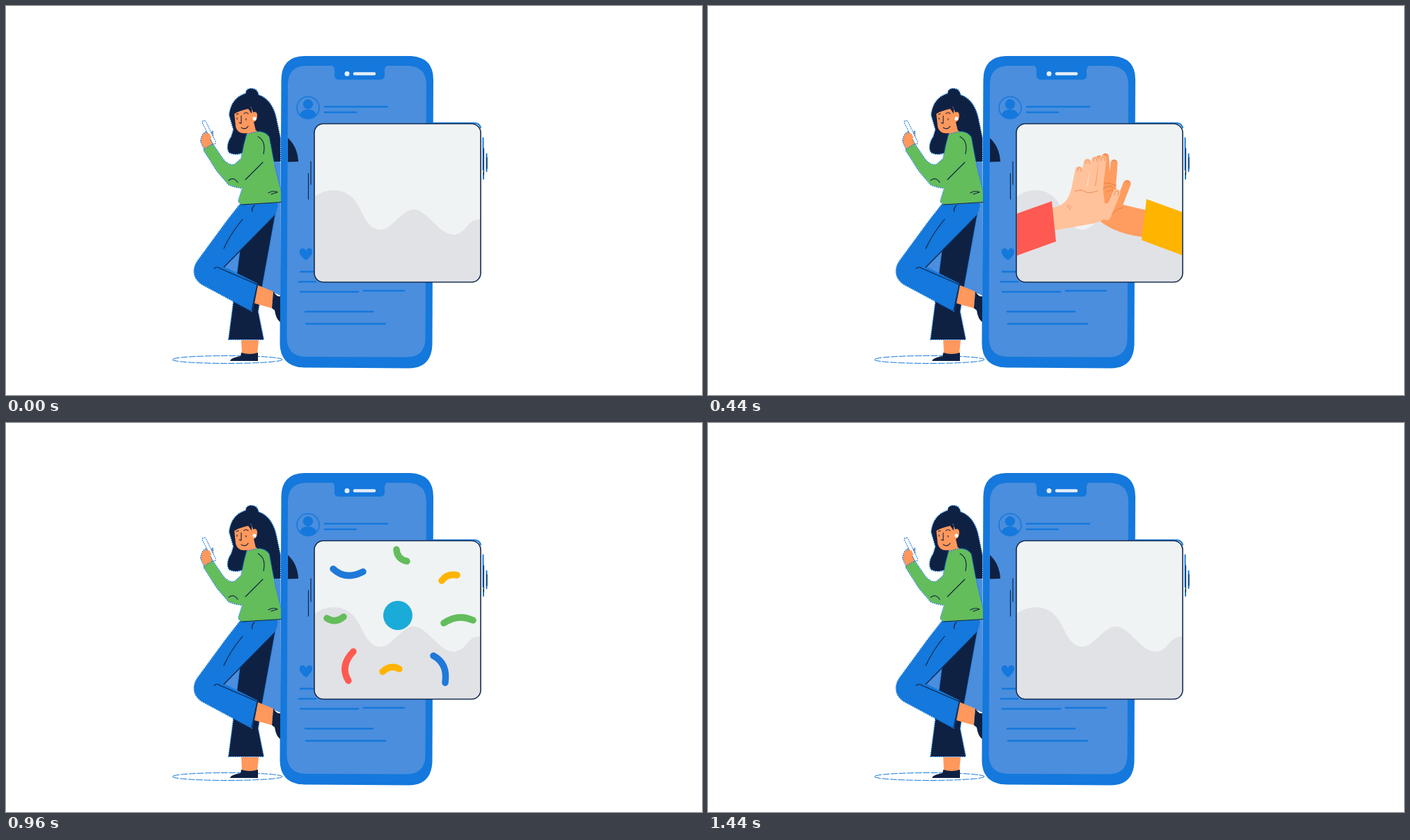
Write an HTML page that moves like this. It is 1000 px wide and 560 px high and loops after 1680 ms.

```html
<!DOCTYPE html>
<html lang="en">
<head>
<meta charset="utf-8">
<style>
  html, body { margin: 0; width: 100%; height: 100%; overflow: hidden; background: #fff; }
  svg { display: block; width: 100vw; height: 100vh; }
  .line { fill: none; stroke-linecap: round; stroke-linejoin: round; }
  .navy { fill: #0f2143; }
  .blue { fill: #1478dc; }
  .sky { fill: #4a8edd; }
  .skin { fill: #ff985c; }
  .ink { stroke: #0f2143; stroke-width: 1.1; }
  .edge { stroke: #1478dc; stroke-width: 2; stroke-dasharray: 2 1; paint-order: stroke; }
</style>
</head>
<body>
<svg viewBox="0 0 1000 560">
  <defs>
    <clipPath id="frame"><rect x="444" y="170.5" width="237" height="226" rx="12"/></clipPath>
  </defs>

  <!-- phone -->
  <path class="blue" d="M428 72H582Q614 74 614 106L612.500 488Q611 521 579 521.500L428 520.500Q394 519 393.500 486L395.500 106Q396 73 428 72Z"/>
  <path class="sky" d="M430 86H578Q604 87 604 114L602.500 479Q602 505 576 505.500L430 505Q404 504 403.500 478L405 112Q406 87 430 86Z"/>
  <path class="blue" d="M466 85Q472 86 472 92V100Q472 106 479 106H537Q544 106 544 100V92Q544 86 550 85Z"/>
  <circle cx="490" cy="97.500" r="3.500" fill="#e4edf8"/>
  <path class="line" d="M501 97.500H529" stroke="#e4edf8" stroke-width="4.500"/>
  <path class="navy" d="M405 190Q419 203 420 224L405 224.500Z"/>
  <g class="line" stroke="#1478dc" stroke-width="2.600">
    <circle cx="434" cy="146.500" r="16" stroke-width="1.500"/>
    <path d="M458 145H548M458 153H503M423 382.500H445M421 397H445M423 411.500H506M514 410H572M430 440H527M431 457.500H545"/>
  </g>
  <circle class="blue" cx="434" cy="141.500" r="7.200"/>
  <path class="blue" d="M422 157Q424 149 434 149Q444 149 446 157Q434 167 422 157Z"/>
  <path class="blue" d="M431 366C421 360 419 350 425 349Q429 348 431 353Q433 348 437 349C443 351 440 360 431 366Z"/>
  <path class="line ink" d="M438 224V257M434.500 241V278"/>

  <!-- woman -->
  <ellipse class="line" cx="318" cy="509" rx="79" ry="5.500" stroke="#1478dc" stroke-dasharray="9 2.500"/>
  <path class="sky" d="M385 224L394.500 225V268L386 232ZM386 300L390 284H394.500V417L360 402ZM340 348L302 377L340 394Z"/>
  <path class="navy edge" d="M345 126C344 119 353 117 359 121Q363 125 362 128C378 133 386 148 389 166L394 190V224H383L360 186L342 210Q332 216 321 211C316 204 320 194 324 188L327 178L321 157C323 139 332 130 345 126Z"/>
  <path class="skin" d="M328 154L352 145L355 153Q361 151 361 158Q361 165 356 167L360 184L347 186L346 183Q333 185 330 174Z"/>
  <path class="navy" d="M323 158Q336 150 348 148L353 155V148L346 137L329 145Z"/>
  <path class="line ink" d="M338 158L338 169L335 168M332 161V163M345 162V164M331 156L334 155M342 155Q345 152 348 155M338 175Q344 179 348 173"/>
  <circle cx="357" cy="162" r="2.600" fill="#fff"/>
  <path class="skin" d="M347 184L360 179L362 186L347 189Z"/>
  <path class="skin edge" d="M285 206L280 195Q281 183 289 181L295 185L297 180V198L296 202Z"/>
  <path class="edge" fill="#fff" d="M282 167Q285 164 287 167L301 196Q299 201 297 197Z"/>
  <path class="skin" d="M281 190L292 183L295 189L289 199Z"/>
  <path class="navy edge" d="M387 297L337 348L331 395L320 480H370L362 440L368 402Z"/>
  <path class="blue edge" d="M336 286L390 283Q390 293 385 302L313 376L361 400L353 439L286 403C269 395 266 379 277 365L318 309Z"/>
  <path fill="#63bd5b" class="edge" d="M346 185L362 181Q373 181 378 189L386 232L395 267V283L338 286L334 281L340 262Q328 261 320 257L303 237L284 207L297 199L312 221Q321 231 329 228L338 220L342 200Z"/>
  <path class="line ink" d="M362 188Q374 194 370 213M369 225L344 250M320 251Q327 245 333 254M377 269Q384 265 390 268L381 271M338 286L395 282.500M357 287Q352 291 354 296M386 302L313 376M340 307Q323 327 313 349M299 378Q303 374 308 378L361 401L353 438M346 467L363 469M349 471H361"/>
  <path class="skin" d="M362 402L384 411L382 435L357 428ZM338 481H363L361 501H339Z"/>
  <path class="navy" d="M384 411Q389 419 394 418V455Q388 451 386 438L382 435ZM322 511Q322 507 337 504L338 499Q350 503 362 499V511Z"/>

  <!-- card -->
  <path class="line" d="M614 168.500H674Q680 169 682 175M685.500 190V236M690.500 213V238M686 240V249" stroke="#1478dc" stroke-width="2"/>
  <path class="line ink" d="M686.500 205V243M691 218V234"/>
  <rect x="443" y="169.500" width="239" height="228" rx="13" fill="#eff3f4"/>
  <g clip-path="url(#frame)">
    <path fill="#e1e2e6" d="M443 275C460 262 482 262 497 275C513 291 516 322 538 322C555 322 568 293 586 293C605 293 622 329 643 329C662 329 660 308 682 307V398H443Z"/>
    <circle id="badge" r="21" fill="#1babd8"/>
    <g id="right">
      <g class="line" stroke="#ff9c60" stroke-width="10">
        <path d="M553 235L559 260M562 220L565 258M571 217L574 258M583.500 226L581 260"/>
        <path d="M602 256L588 292" stroke-width="11"/>
      </g>
      <path fill="#ff9c60" d="M554 254Q570 247 586 256L588 276Q592 286 600 287L630 294L627 333Q587 328 565 311Q549 292 554 254Z"/>
      <path class="line" stroke="#e57a3e" d="M558 257Q570 252 586 258M567 263Q578 256 582 262M572 268Q580 262 586 270M575 306Q582 294 596 290M600 253Q603 250 606 254M569 214Q572 211 574 215M581 223Q584 220 587 224"/>
      <path fill="#ffb400" d="M630 278L770 329V392L623 337Z"/>
    </g>
    <g id="left">
      <g class="line" stroke="#ffc29b" stroke-width="10.500">
        <path d="M533 236L526 270M545 225L538 266M556 222L550 264M567 221L562 266"/>
        <path d="M587 269L573 303" stroke-width="11"/>
      </g>
      <path fill="#ffc29b" d="M521 266Q541 255 567 260L570 284L585 284Q578 308 554 313L498 323L494 290Q516 288 521 266Z"/>
      <path class="line" stroke="#ed8d59" d="M527 267Q535 263 541 267T560 266M515 287L521 293M518 286L522 290M570 284Q575 281 579 272M531 238V234Q533 231 536 234V238M543 227V223Q545 220 548 223V227M554 224V220Q556 217 559 220V224M565 223V219Q567 216 570 219V223M584 272Q584 266 588 266Q591 268 589 273"/>
      <path fill="#ff5a52" d="M494 281L340 336V397L500 339Z"/>
    </g>
    <g id="confetti" class="line" stroke-width="9.500"></g>
  </g>
  <rect class="line" x="443" y="169.500" width="239" height="228" rx="13" stroke="#142a4e" stroke-width="1.600"/>
</svg>
<script>
const LOOP = 1680, STEP = 40;
const $ = id => document.getElementById(id);
const clamp = x => Math.min(1, Math.max(0, x));
const ramp = (t, a, b) => clamp((t - a) / (b - a));
const ease = x => x * x * (3 - 2 * x);

const BLUE = '#1f79d8', GREEN = '#63bd5b', AMBER = '#ffb400', RED = '#ff5a52';
// colour, centre, curve around the centre, start time, spin in degrees
const pieces = [
  [BLUE, 492, 217, 'M-22-7Q-4 10 21-3', 635, 7],
  [GREEN, 568, 191, 'M-7-9Q-6 5 8 8', 635, 7],
  [AMBER, 637, 222, 'M-11 5Q-3-6 11-3', 635, 7],
  [GREEN, 473, 282, 'M-12-1Q0 7 12-3', 720, 0],
  [GREEN, 650, 283, 'M-21 5Q0-9 21 1', 720, 5],
  [RED, 492, 350, 'M7-21Q-13 0 0 21', 740, 2],
  [AMBER, 553, 354, 'M-12 4Q0-7 12 0', 760, 1],
  [BLUE, 624, 354, 'M-10-19Q11-8 7 20', 760, -1]
].map(([color, x, y, d, start, spin]) => {
  const el = document.createElementNS('http://www.w3.org/2000/svg', 'path');
  el.setAttribute('d', d);
  el.setAttribute('stroke', color);
  $('confetti').append(el);
  return { el, x, y, start, spin };
});

function place(el, x, y, size, angle = 0) {
  el.setAttribute('visibility', size > 0 ? 'visible' : 'hidden');
  el.setAttribute('transform', `translate(${x} ${y}) rotate(${angle}) scale(${size})`);
}

function draw(t) {
  // 0 = palms touching, 1 = hands outside the card
  const away = t < 450 ? 1 - ease(ramp(t, 130, 440)) : ease(ramp(t, 460, 910));
  const shown = t >= 200 && t < 910 ? 'visible' : 'hidden';
  $('left').setAttribute('visibility', shown);
  $('right').setAttribute('visibility', shown);
  $('left').setAttribute('transform',
    `translate(${567 - 157 * away} ${217 + 39 * away}) rotate(${-13 * away}) scale(${1 - 0.08 * away}) translate(-567 -217)`);
  $('right').setAttribute('transform', `translate(${129 * away} ${13 * away})`);

  const leave = 1 - ease(ramp(t, 1280, 1440));
  place($('badge'), 563, 277, ease(ramp(t, 460, 620)) * leave);
  for (const p of pieces)
    place(p.el, p.x, p.y, ease(ramp(t, p.start, p.start + 160)) * leave, p.spin * (t - 960) / 320);
}

const begin = performance.now();
function tick(now) {
  const t = Math.max(0, now - begin) % LOOP;
  draw(Math.floor(t / STEP) * STEP);
  requestAnimationFrame(tick);
}
draw(0);
requestAnimationFrame(tick);
</script>
</body>
</html>
```
